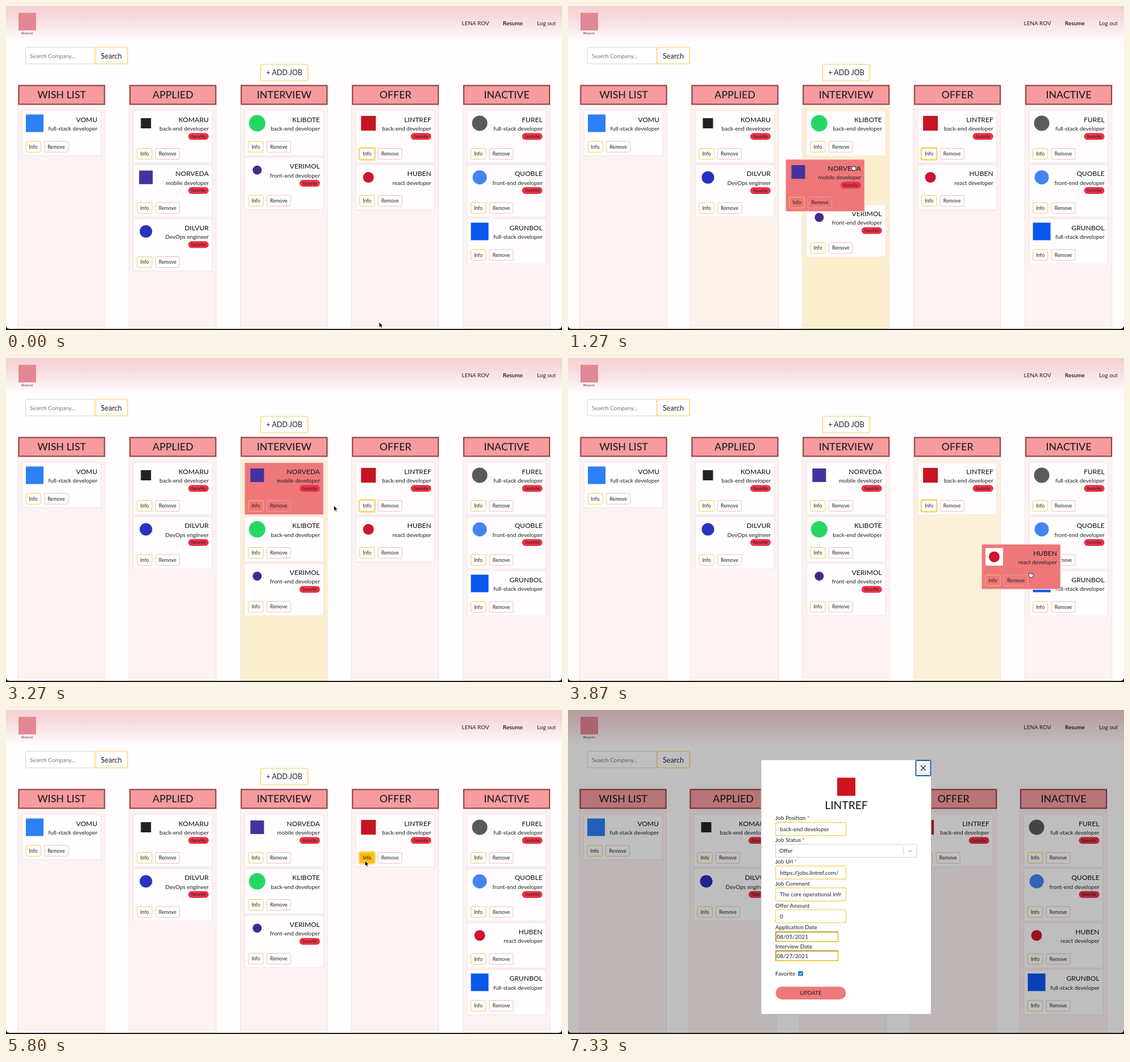
An HTML page for the animation above (7470 ms loop, 979 px wide and 572 px high).

```html
<!DOCTYPE html>
<html lang="en">
<head>
<meta charset="utf-8">
<title>Job board</title>
<style>
  html, body { margin: 0; width: 100%; height: 100%; overflow: hidden; background: #17171a; }
  svg { display: block; }
  text { font-family: Lato, sans-serif; fill: #1f2226; white-space: pre; }
</style>
</head>
<body>
<script>
const LOOP = 7470, W = 979, H = 572;
const NS = 'http://www.w3.org/2000/svg';
const AMBER = '#f5cb52';

const el = (parent, tag, attrs = {}, content) => {
  const node = document.createElementNS(NS, tag);
  for (const key in attrs) node.setAttribute(key, attrs[key]);
  if (content !== undefined) node.textContent = content;
  return parent.appendChild(node);
};
const rect = (p, x, y, width, height, fill, more) => el(p, 'rect', { x, y, width, height, fill, ...more });
const text = (p, x, y, size, str, more) => el(p, 'text', { x, y, 'font-size': size, ...more }, str);
const group = (p, more) => el(p, 'g', more);
const move = (node, x, y) => node.setAttribute('transform', `translate(${x.toFixed(2)} ${y.toFixed(2)})`);
const clamp = v => Math.max(0, Math.min(1, v));
const mix = (a, b, k) => a + (b - a) * k;
const easeOut = p => 1 - (1 - clamp(p)) ** 4;
const easeInOut = p => { p = clamp(p); return p * p * (3 - 2 * p); };
const MID = { 'text-anchor': 'middle' }, END = { 'text-anchor': 'end' };

const svg = el(document.body, 'svg', { width: W, height: H, viewBox: `0 0 ${W} ${H}` });
const defs = el(svg, 'defs');
const grad = el(defs, 'linearGradient', { id: 'top', x1: 0, y1: 0, x2: 0, y2: 1 });
el(grad, 'stop', { offset: 0, 'stop-color': '#f5cfd3' });
el(grad, 'stop', { offset: 0.35, 'stop-color': '#f8dcdf' });
el(grad, 'stop', { offset: 1, 'stop-color': '#fffdfe' });
const clip = el(defs, 'clipPath', { id: 'window' });
rect(clip, 0, -20, W, 590, '#000', { rx: 6 });

const page = group(svg, { 'clip-path': 'url(#window)' });
rect(page, 0, 0, W, H, '#fffdfe');
rect(page, 0, 0, W, 64, 'url(#top)');

// Top bar and search
rect(page, 22, 12, 31, 31, '#e28795');
text(page, 37.5, 50, 5, 'Wopsel', { ...MID, 'letter-spacing': 0.8 });
text(page, 802.5, 33.5, 10, 'LENA ROV');
text(page, 875, 33.5, 10, 'Resume', { 'font-weight': 500, style: 'fill:#000' });
text(page, 935, 33.5, 10, 'Log out');
rect(page, 34.5, 73, 122, 29, '#fff', { rx: 2.5, stroke: '#d2d6da' });
text(page, 42, 91.5, 10, 'Search Company...', { style: 'fill:#6c757d' });
rect(page, 156.7, 73, 57.6, 29, '#fff', { rx: 3, stroke: AMBER, 'stroke-width': 1.2 });
text(page, 185.5, 92.5, 12.5, 'Search', MID);
const addJob = group(page);
rect(addJob, 448.5, 103, 83, 29, '#fff', { rx: 3, stroke: AMBER, 'stroke-width': 1.2 });
text(addJob, 490, 122.3, 12.5, '+ ADD JOB', MID);

// Columns
const columns = ['WISH LIST', 'APPLIED', 'INTERVIEW', 'OFFER', 'INACTIVE'].map(title => {
  const node = group(page);
  rect(node, 0, 139, 153, 440, '#fdf3f3', { stroke: '#faeaea', 'stroke-width': 2 });
  const glow = rect(node, 1, 179, 151, 400, '#fcefcd', { opacity: 0 });
  rect(node, 1.5, 140.5, 151, 33, '#f79b9e', { stroke: '#8b3d41', 'stroke-width': 2 });
  text(node, 77, 163, 17.8, title, { ...MID, 'font-weight': 500 });
  return { node, glow };
});

// Cards: name, role, favorite, badge shape, badge size, badge colour
const DATA = {
  a: ['VOMU', 'full-stack developer', 0, 'square', 31, '#2d7ff5'],
  b: ['KOMARU', 'back-end developer', 1, 'square', 18, '#262223'],
  d: ['DILVUR', 'DevOps engineer', 1, 'circle', 22, '#2a30c0'],
  e: ['KLIBOTE', 'back-end developer', 0, 'circle', 29, '#25d865'],
  f: ['VERIMOL', 'front-end developer', 1, 'circle', 16, '#46288a'],
  g: ['LINTREF', 'back-end developer', 1, 'square', 26, '#c51422'],
  i: ['FUREL', 'full-stack developer', 1, 'circle', 27, '#5a5a5c'],
  j: ['QUOBLE', 'front-end developer', 1, 'circle', 25, '#4285f4'],
  k: ['GRUNBOL', 'full-stack developer', 0, 'square', 31, '#0a57ee'],
  c: ['NORVEDA', 'mobile developer', 1, 'square', 24, '#41349f'],
  h: ['HUBEN', 'react developer', 0, 'circle', 19, '#cf1530']
};

function badge(p, shape, cx, cy, size, fill) {
  if (shape === 'circle') el(p, 'circle', { cx, cy, r: size / 2, fill });
  else rect(p, cx - size / 2, cy - size / 2, size, size, fill);
}

function button(p, x, y, width, label, stroke) {
  const box = rect(p, x, y, width, 19, '#fff', { rx: 2, stroke });
  text(p, x + width / 2, y + 12.6, 8.7, label, MID);
  return box;
}

function makeCard(key) {
  const [name, role, fav, shape, size, color] = DATA[key];
  const node = group(page);
  const box = rect(node, 0, 0.5, 139.5, fav ? 92.5 : 80, '#fffdfe', { stroke: '#f8e7e8', 'stroke-width': 1.6 });
  const plate = rect(node, 7, 7.5, 31, 31, '#fff', { opacity: 0 });
  badge(node, shape, 22.5, 23, size, color);
  text(node, 133, 20.6, 12.05, name, { ...END, 'font-weight': 500 });
  text(node, 133, 36, 10, role, END);
  if (fav) {
    rect(node, 97, 40.3, 36, 12, '#ea3246', { rx: 6 });
    text(node, 115, 48.9, 7.6, 'favorite', MID);
  }
  const by = fav ? 67.5 : 55;
  const ring = rect(node, 5.8, by - 1.2, 28.6, 21.4, 'none', { rx: 3, stroke: '#fbdc85', 'stroke-width': 2.4, opacity: key === 'g' ? 1 : 0 });
  const info = button(node, 7, by, 26.2, 'Info', AMBER);
  const remove = button(node, 39.5, by, 42, 'Remove', '#f2b9c1');
  return { node, box, plate, ring, info, remove, step: fav ? 95.5 : 82.7 };
}
const cards = {};
for (const key in DATA) cards[key] = makeCard(key);

// Board order over time; a missing card is in the air
const BOARD = [
  [0, 'a|bcd|ef|gh|ijk'],
  [1146, 'a|bd|ef|gh|ijk'],
  [1190, 'a|bd|ecf|gh|ijk'],
  [2740, 'a|bd|cef|gh|ijk'],
  [3960, 'a|bd|cef|g|ijhk']
];
// Card, grab, release, landing, grip point
const DRAGS = [
  ['c', 1070, 1480, 1880, 120, 16],
  ['c', 2650, 2900, 3300, 83, 30],
  ['h', 3610, 4198, 4598, 87, 55]
];
// Highlighted column, from, to
const GLOWS = [[1, 1070, 1110], [2, 1150, 1880], [2, 2650, 3300], [3, 3610, 3810], [4, 3960, 4598]];
// Pointer stops: time, x, y
const PATH = [
  [70, 657, 558], [760, 344, 297], [1070, 344, 297], [1270, 503, 286], [1430, 538, 286],
  [1650, 538, 286], [2130, 839, 266], [2280, 839, 266], [2600, 503, 298], [2650, 503, 298],
  [2860, 502, 216], [3080, 502, 216], [3540, 703, 335], [3610, 703, 335], [3870, 815, 383],
  [4130, 860, 408], [4670, 860, 408], [5500, 632, 266], [6270, 632, 266], [6700, 560, 430],
  [7060, 610, 330], [7300, 720, -24]
];
const FIST = [[740, 1560], [2560, 3080], [3520, 4500]], POINT = [[2080, 2340]];
const OPEN = 5900;

// Dialog
const shade = rect(page, 0, 0, W, H, '#000', { opacity: 0 });
const dialog = group(page);
rect(dialog, 340, 88, 299.5, 449, '#fff', { stroke: '#b3afb1', 'stroke-width': 0.8 });
rect(dialog, 612.5, 89, 26, 27, '#f2f3f5', { rx: 1.5, stroke: '#1d5a9e', 'stroke-width': 1.8 });
el(dialog, 'path', { d: 'M621 98l9 9m0 -9l-9 9', stroke: '#222', 'stroke-width': 1.2 });
badge(dialog, 'square', 490, 135.5, 32, '#d0141f');
text(dialog, 490, 174.6, 19.2, DATA.g[0], { ...MID, 'font-weight': 500 });

function label(y, str, required) {
  const node = text(dialog, 365, y, 10, str);
  if (required) el(node, 'tspan', { fill: '#e0202c' }, ' *');
}
function field(y, value) {
  rect(dialog, 365.5, y, 124, 23, '#fff', { rx: 2.5, stroke: '#f8d264', 'stroke-width': 1.4 });
  const inner = el(dialog, 'svg', { x: 373, y, width: 109, height: 23 });
  text(inner, 0, 15.3, 10, value);
}
function dateField(y, value) {
  rect(dialog, 366, y, 109.5, 17, '#fff', { stroke: '#efb90f', 'stroke-width': 1.6 });
  el(dialog, 'path', { d: `M366 ${y + 17}V${y}H475.5`, fill: 'none', stroke: '#b48f1c', 'stroke-width': 1.6 });
  text(dialog, 367.5, y + 12.3, 10, value);
}
label(194, 'Job Position', true);
field(198.5, 'back-end developer');
label(232.5, 'Job Status', true);
rect(dialog, 365.5, 237, 248.5, 23, '#fff', { stroke: '#ccc' });
text(dialog, 372, 252, 10, 'Offer');
el(dialog, 'path', { d: 'M591 241.5v14', stroke: '#ccc' });
el(dialog, 'path', { d: 'M598.8 247l3.7 3.7l3.7 -3.7', fill: 'none', stroke: '#bbb', 'stroke-width': 1.5 });
label(271.2, 'Job Url', true);
field(275.5, 'https://jobs.lintref.com/');
label(309.8, 'Job Comment');
field(314, 'The core operational infrastructure');
label(348.5, 'Offer Amount');
field(352.6, '0');
label(387, 'Application Date');
dateField(391.7, '08/05/2021');
label(420.6, 'Interview Date');
dateField(425.4, '08/27/2021');
label(469.2, 'Favorite');
rect(dialog, 405.3, 461, 8.6, 8.6, '#0d6fe8', { rx: 1.5 });
el(dialog, 'path', { d: 'M407.3 465.5l1.7 1.8l3 -4', fill: 'none', stroke: '#fff', 'stroke-width': 1.2 });
rect(dialog, 365.8, 488.5, 123.4, 22.5, '#ef787b', { rx: 11.2 });
text(dialog, 427.5, 503.4, 10, 'UPDATE', MID);

// Pointer shapes
const pointer = group(svg);
const arrow = el(pointer, 'path', {
  d: 'M0 0V9.6L2.2 7.6L3.7 11L5.4 10.3L3.9 7H6.9Z', fill: '#000', stroke: '#fff', 'stroke-width': 0.8
});
const skin = { fill: '#fff', stroke: '#222', 'stroke-width': 0.9, 'stroke-linejoin': 'round' };
const fist = el(pointer, 'path', {
  d: 'M-3.5 -1.5Q-3 -3.6 -1.4 -2.8Q-.4 -4 .8 -2.9Q2 -3.7 2.8 -2.4Q4.2 -2.6 4.1 -.8Q4.2 2 2.9 4.2H-1.7Q-4.6 1.4 -3.5 -1.5ZM-1.4 -2.6V-.8M.8 -2.8V-.8M2.8 -2.3V-.8', ...skin
});
const finger = el(pointer, 'path', {
  d: 'M-1.4 2.4V-2.6Q-.4 -4.2 .5 -2.6V.2L3.9 1Q5 1.4 4.8 3L4 6.6H-.3Q-2 4.6 -4 2.2Q-3.4 .8 -1.4 2.4ZM2 1.2V2.4M3.5 1.4V2.6', ...skin
});

function cursorAt(t) {
  let prev = PATH[0];
  for (const stop of PATH) {
    if (t < stop[0]) {
      const k = easeInOut((t - prev[0]) / (stop[0] - prev[0]));
      return [mix(prev[1], stop[1], k), mix(prev[2], stop[2], k)];
    }
    prev = stop;
  }
  return [prev[1], prev[2]];
}

const within = (spans, t) => spans.some(([from, to]) => t >= from && t < to);
const show = (node, on) => node.setAttribute('visibility', on ? 'visible' : 'hidden');

function cardPlaces(t, shiftOf) {
  const places = {};
  for (const [start, order] of BOARD) {
    if (t < start) break;
    const k = start ? easeOut((t - start) / 200) : 1;
    order.split('|').forEach((keys, col) => {
      const x = 28 + 195.9 * col + shiftOf(col);
      let y = 184;
      for (const key of keys) {
        const old = places[key] || [x, y];
        places[key] = [mix(old[0], x, k), mix(old[1], y, k)];
        y += cards[key].step;
      }
    });
  }
  return places;
}

function render(t) {
  const open = t >= OPEN;
  const shiftOf = col => open ? -1 - 2 * col : 0;
  const [cx, cy] = cursorAt(t);

  columns.forEach(({ node, glow }, col) => {
    move(node, 21 + 195.9 * col + shiftOf(col), 0);
    let amount = 0;
    for (const [c, from, to] of GLOWS)
      if (c === col) amount += clamp((t - from) / 120) * (1 - clamp((t - to) / 200));
    glow.setAttribute('opacity', clamp(amount));
  });
  move(addJob, shiftOf(2), 0);

  const places = cardPlaces(t, shiftOf);
  const held = new Set();
  for (const [key, grab, drop, land, gx, gy] of DRAGS) {
    if (t < grab || t >= land) continue;
    held.add(key);
    const [hx, hy] = cursorAt(Math.min(t, drop));
    const k = easeOut((t - drop) / (land - drop));
    const home = places[key] || [0, 0];
    places[key] = [mix(hx - gx, home[0], k), mix(hy - gy, home[1], k)];
  }
  for (const key in cards) {
    const { node, box, plate, info, remove } = cards[key];
    const up = held.has(key);
    move(node, ...places[key]);
    box.setAttribute('fill', up ? '#ee777a' : '#fffdfe');
    plate.setAttribute('opacity', up && key === 'h' ? 1 : 0);
    info.setAttribute('fill', up ? 'none' : '#fff');
    remove.setAttribute('fill', up ? 'none' : '#fff');
    remove.setAttribute('stroke', up ? '#f39a9f' : '#f2b9c1');
  }

  if (t >= 2120 && t < 2330) cards.i.info.setAttribute('fill', '#f6c84c');
  if (t >= 5460 && t < OPEN) cards.g.info.setAttribute('fill', t < 5720 ? '#f8c93f' : '#fbbd0c');
  show(cards.g.ring, !open);

  shade.setAttribute('opacity', 0.25 * clamp((t - OPEN) / 150));
  const rise = (t - OPEN) / 300;
  dialog.setAttribute('opacity', clamp(rise));
  move(dialog, 0, -50 * (1 - easeOut(rise)));

  const closed = within(FIST, t), pointing = within(POINT, t);
  show(arrow, !closed && !pointing);
  show(fist, closed);
  show(finger, pointing);
  move(pointer, cx, cy);
}

const begin = performance.now();
function tick() {
  render((performance.now() - begin) % LOOP);
  requestAnimationFrame(tick);
}
render(0);
requestAnimationFrame(tick);
</script>
</body>
</html>
```
